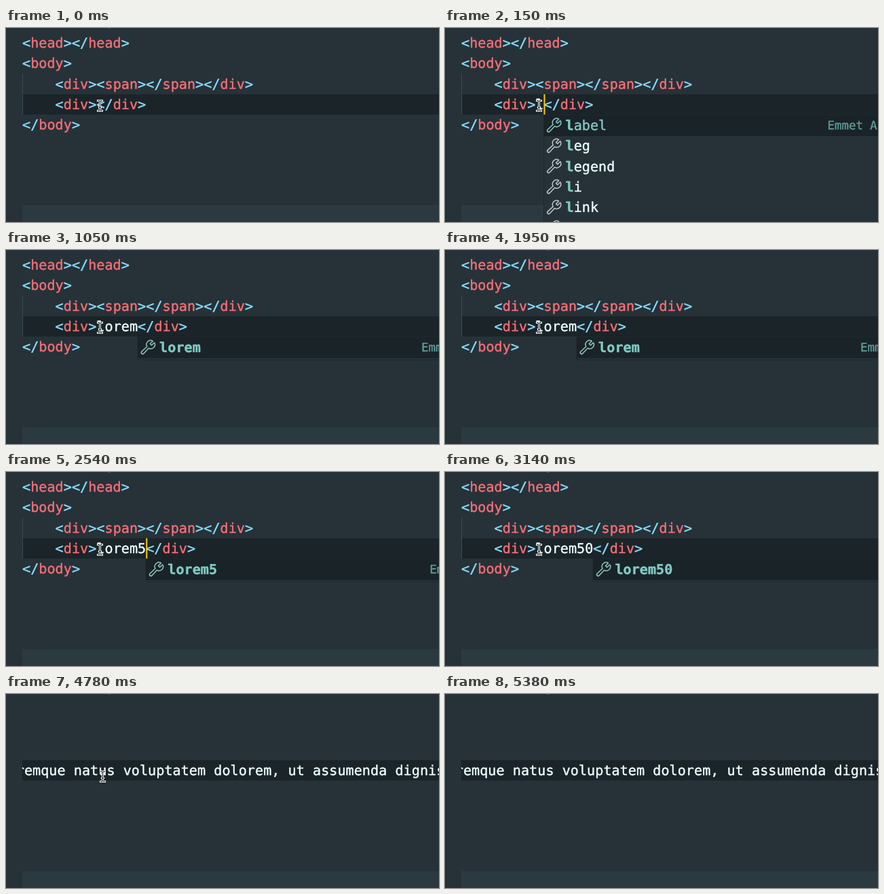
Recreate the animation shown at these times as an HTML page. Size 638x287 px, loop 5840 ms.

```html
<!DOCTYPE html>
<html lang="en">
<head>
<meta charset="utf-8">
<title>Abbreviation typing</title>
<style>
  html, body { margin: 0; width: 100%; height: 100%; overflow: hidden; background: #263238; }
  svg { display: block; width: 638px; height: 287px; }
  text {
    font: 20.18px "DejaVu Sans Mono", "Liberation Mono", monospace;
    white-space: pre;
    text-rendering: geometricPrecision;
    fill: #eeffff;
    stroke: #eeffff;
    stroke-width: 0.4;
  }
  .punct { fill: #89ddff; stroke: #89ddff; }
  .tag { fill: #f86f78; stroke: #f86f78; }
  .match { fill: #80cbc4; stroke: #80cbc4; font-weight: bold; }
  .picked { fill: #80cbc4; stroke: #80cbc4; }
  .detail { font-size: 17.4px; fill: #5f9c98; stroke: #5f9c98; }
  .icon { fill: none; stroke: #c0c8cb; stroke-width: 1; stroke-linejoin: round; }
  .icon.picked { stroke: #8fc6c1; fill: none; }
  #ibeam { fill: none; stroke-linecap: square; }
</style>
</head>
<body>
<svg viewBox="0 0 638 287">
  <defs>
    <clipPath id="pane"><rect x="24" width="614" height="287"/></clipPath>
    <path id="wrench" d="M12.9 1.6 10.2 4.3 11.7 5.8 14.4 3.1A4 4 0 0 1 8.9 8.6L3.9 13.9A1.3 1.3 0 0 1 2 12L7.3 7A4 4 0 0 1 12.9 1.6Z"/>
    <path id="ibeam" d="M1.5 1.5H3Q4.5 1.5 4.5 3.5Q4.5 1.5 6 1.5H7.5M4.5 3.5V14.5M1.5 16.5H3Q4.5 16.5 4.5 14.5Q4.5 16.5 6 16.5H7.5M3.4 11.5H5.6"/>
  </defs>
  <rect width="638" height="287" fill="#263238"/>
  <rect x="150" width="4" height="1" fill="#465359"/>
  <rect x="24" y="262" width="614" height="25" fill="#2b3a41"/>
  <rect x="24" y="98" width="614" height="30" fill="#1b2428"/>
  <g id="markup">
    <rect x="24" y="67" width="1" height="61" fill="#3b494f"/>
  </g>
  <g clip-path="url(#pane)">
    <text id="filler" x="14.8" y="120">remque natus voluptatem dolorem, ut assumenda dignissimos</text>
  </g>
  <g id="menu"></g>
  <rect id="caret" y="98" width="2" height="30" fill="#ffcc00"/>
  <g id="mouse">
    <use href="#ibeam" stroke="#eef2f2" stroke-width="3"/>
    <use href="#ibeam" stroke="#1b2428" stroke-width="1"/>
  </g>
</svg>
<script>
const LOOP = 5840, LEFT = 24, CELL = 12.15, PITCH = 30.33;
const $ = id => document.getElementById(id);
const show = (el, on) => el.setAttribute('visibility', on ? 'visible' : 'hidden');
const baseline = row => 120 + (row - 3) * PITCH;
const column = n => LEFT + n * CELL;

// start time, typed text, suggestion, caret shown
const typing = [
  [0, '', '', false],
  [150, 'l', 'l', true],
  [300, 'lo', 'lo', true],
  [450, 'lorem', 'lore', true],
  [600, 'lorem', 'lorem', true],
  [1050, 'lorem', 'lorem', false],
  [1500, 'lorem', 'lorem', true],
  [1950, 'lorem', 'lorem', false],
  [2540, 'lorem5', 'lorem5', true],
  [2690, 'lorem50', 'lorem50', true],
  [3140, 'lorem50', 'lorem50', false],
  [3590, null, '', false]
];

// start time, pointer position
const pointer = [
  [0, 134, 106], [4780, 138, 113], [4930, 210, 189],
  [5080, 306, 233], [5230, 480, 272], [5380, -50, -50]
];

function add(parent, name, attrs, content) {
  const el = document.createElementNS('http://www.w3.org/2000/svg', name);
  for (const key in attrs) el.setAttribute(key, attrs[key]);
  if (content) el.textContent = content;
  parent.append(el);
  return el;
}

// Colours brackets, tag names and plain text.
function setCode(el, code) {
  el.textContent = '';
  for (const part of code.match(/<\/?|>|[^<>]+/g)) {
    const before = el.lastChild && el.lastChild.textContent;
    const kind = /[<>]/.test(part) ? 'punct' : /^</.test(before || '') ? 'tag' : '';
    add(el, 'tspan', { class: kind }, part);
  }
}

function addLine(row, indent, code) {
  const el = add($('markup'), 'text', { x: column(indent), y: baseline(row) });
  setCode(el, code);
  return el;
}

addLine(0, 0, '<head></head>');
addLine(1, 0, '<body>');
addLine(2, 4, '<div><span></span></div>');
const editLine = addLine(3, 4, '<div></div>');
addLine(4, 0, '</body>');

function drawMenu(word) {
  const menu = $('menu');
  menu.textContent = '';
  if (!word) return;
  const items = word === 'l' ? ['label', 'leg', 'legend', 'li', 'link', 'linkalt'] : [word];
  const x = column(9 + word.length);
  const height = items.length > 1 ? 170 : 34;
  add(menu, 'rect', { x, y: 128.5, width: 700, height, fill: '#263238', stroke: '#1f292e' });
  add(menu, 'rect', { x, y: 129, width: 700, height: 31, fill: '#1a2327' });
  items.forEach((item, i) => {
    const picked = i ? '' : 'picked';
    const y = 151 + i * PITCH;
    add(menu, 'use', {
      href: '#wrench', class: 'icon ' + picked,
      transform: `translate(${x + 2.8} ${y - 18.7}) scale(1.5)`
    });
    const label = add(menu, 'text', { x: x + 32, y });
    add(label, 'tspan', { class: 'match' }, word);
    add(label, 'tspan', { class: picked }, item.slice(word.length));
  });
  add(menu, 'text', { x: x + 418, y: 150, class: 'detail' }, 'Emmet Abbreviation');
}

function drawTyping([, typed, word, caretOn]) {
  const expanded = typed === null;
  show($('markup'), !expanded);
  show($('filler'), expanded);
  show($('caret'), caretOn);
  drawMenu(word);
  if (expanded) return;
  setCode(editLine, `<div>${typed}</div>`);
  $('caret').setAttribute('x', column(9 + typed.length));
}

const current = (steps, t) => steps.findLast(step => step[0] <= t);
let shown;

function frame() {
  const t = performance.now() % LOOP;
  const step = current(typing, t);
  if (step !== shown) drawTyping(shown = step);
  const [, x, y] = current(pointer, t);
  $('mouse').setAttribute('transform', `translate(${x} ${y})`);
  requestAnimationFrame(frame);
}
frame();
</script>
</body>
</html>
```
